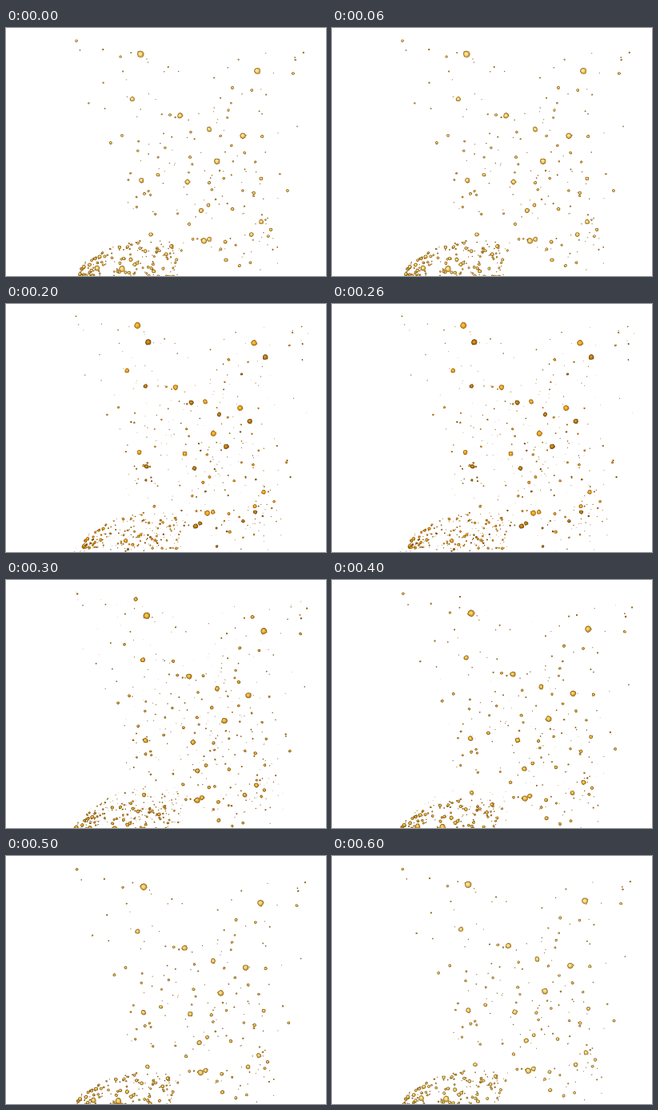
Animation of 400x311 px, one loop 0.7 s. Source, as an HTML page with a canvas:

```html
<!DOCTYPE html>
<html lang="en">
<head>
<meta charset="utf-8">
<title>Gold dust</title>
<style>
html, body { margin: 0; overflow: hidden; background: #fff; }
canvas { display: block; }
</style>
</head>
<body>
<canvas id="stage" width="400" height="311"></canvas>
<script>
const ctx = document.getElementById('stage').getContext('2d');
const STEPS = 7, STEP_MS = 100;

// Large nuggets: x, y, vx, vy, radius
const nuggets = [
  [168, 33, -2, -3, 4.4], [314, 54, -2, -2.5, 4.3], [158, 89, -3.3, -2.8, 3.4],
  [217.5, 110, -2.8, -2.7, 3.7], [254, 127, -2.5, -2.3, 3.3], [296, 135, -1.7, -2.4, 3.9],
  [264, 167, -2.2, -2.3, 3.9], [227, 193, -1.7, -2.6, 3.4], [169, 191, -1.3, -2.6, 3.4],
  [247.5, 267, 2.1, -2.3, 3.9], [254, 265, 2.3, -2, 3.3], [319, 243, 1.5, -3.6, 3.2]
];

// Smaller nuggets carried by the draught: x, y, radius
const grains = [
  [88, 16, 1.9], [143, 36, 1.8], [359, 57, 2], [283, 75, 2.1], [307, 78, 1.9],
  [278, 103, 1.8], [205, 109, 2], [145, 135, 2.1], [131, 144, 2], [320, 136, 2.2],
  [230, 162, 2.1], [190, 184, 2.5], [254, 194, 2.1], [319, 189, 2.6], [310, 207, 2.4],
  [173, 208, 2], [352, 204, 2], [253, 222, 2.5], [244, 229, 3], [283, 227, 2.3],
  [331, 253, 2.4], [229, 246, 2.3], [307, 259, 3], [274, 268, 2.5], [181, 259, 2.9],
  [275, 291, 2.5], [292, 298, 2.2], [145, 302, 4.2], [114, 301, 3.6]
];

// Rim, body and shine of the gold at each step
const golds = [
  ['#8a5c14', '#dcb048', '#f8e394'], ['#965c08', '#dfa01e', '#f8cc50'],
  ['#985c06', '#d8961a', '#f4bc3c'], ['#845408', '#cb942a', '#f0c452'],
  ['#85560c', '#d2a030', '#f6d264'], ['#855a14', '#d6aa44', '#f6da80'],
  ['#866018', '#dab24e', '#f8e294']
];
const freshGold = ['#6e4206', '#a86c10', '#cf9424'];

let seed = 20;
function rand(lo = 0, hi = 1) {
  seed = (seed * 1664525 + 1013904223) % 4294967296;
  return lo + (hi - lo) * seed / 4294967296;
}

const particles = [];

function add(x, y, r, vx, vy, late = 0) {
  const edge = Array.from({ length: 8 }, () => rand(0.82, 1.12));
  particles.push({ x, y, r, vx, vy, late, edge, spin: rand(-0.4, 0.4) });
}

// The draught leans right near the ground and left higher up, calming at the top.
function drift(x, y, r) {
  const calm = Math.min(1, (y / 45) ** 2);
  add(x, y, r, 2.3 * Math.tanh((y - 213) / 28) * calm, -2.6 * calm, rand(0, 1.3));
}

function scatter(count, x0, x1, y0, y1, size) {
  for (let i = 0; i < count; i++) {
    drift(rand(x0, x1), rand(y0, y1), 0.55 + size * rand() ** 2);
  }
}

scatter(5, 82, 125, 20, 105, 0.9);
scatter(40, 138, 372, 5, 130, 1.1);
scatter(75, 150, 345, 130, 235, 1.4);
scatter(42, 168, 340, 232, 305, 1.5);
for (let i = 0; i < 165; i++) {
  const x = 92 + 122 * rand() ** 1.3;
  const height = 46 * Math.min(1, Math.sqrt((x - 88) / 70));
  drift(x, 312 - height * rand() ** 1.25, 0.65 + 2.1 * rand() ** 2);
}
grains.forEach(g => drift(...g));
nuggets.forEach(([x, y, vx, vy, r]) => add(x, y, r, vx, vy));

function blob(p, x, y, r, turn, color) {
  if (r <= 0) return;
  ctx.fillStyle = color;
  ctx.beginPath();
  p.edge.forEach((e, i) => {
    const a = turn + i * Math.PI / 4;
    ctx.lineTo(x + Math.cos(a) * r * e, y + Math.sin(a) * r * e);
  });
  ctx.fill();
}

// Grow quickly, hold, then shrink away; age 0 is the middle of life.
function drawParticle(p, age, step) {
  const grow = (age + 6.2 - p.late) / 1.4;
  const shrink = (4.8 - p.late - age) / 3;
  const r = p.r * Math.min(1, grow, shrink);
  if (r < 0.2) return;
  const x = p.x + p.vx * age, y = p.y + p.vy * age, turn = p.spin * age;
  const [rim, body, shine] = age < -4 ? freshGold : golds[step];
  blob(p, x, y, r, turn, rim);
  blob(p, x, y, r - 0.75, turn, body);
  blob(p, x - r * 0.08, y - r * 0.1, (r - 0.9) * 0.65, turn, shine);
}

function draw(step) {
  ctx.fillStyle = '#fff';
  ctx.fillRect(0, 0, 400, 311);
  for (const p of particles) {
    drawParticle(p, step, step);
    drawParticle(p, step - STEPS, step);
  }
}

const start = performance.now();
function tick() {
  const elapsed = Math.max(0, performance.now() - start);
  draw(Math.floor(elapsed / STEP_MS) % STEPS);
  requestAnimationFrame(tick);
}
tick();
</script>
</body>
</html>
```
